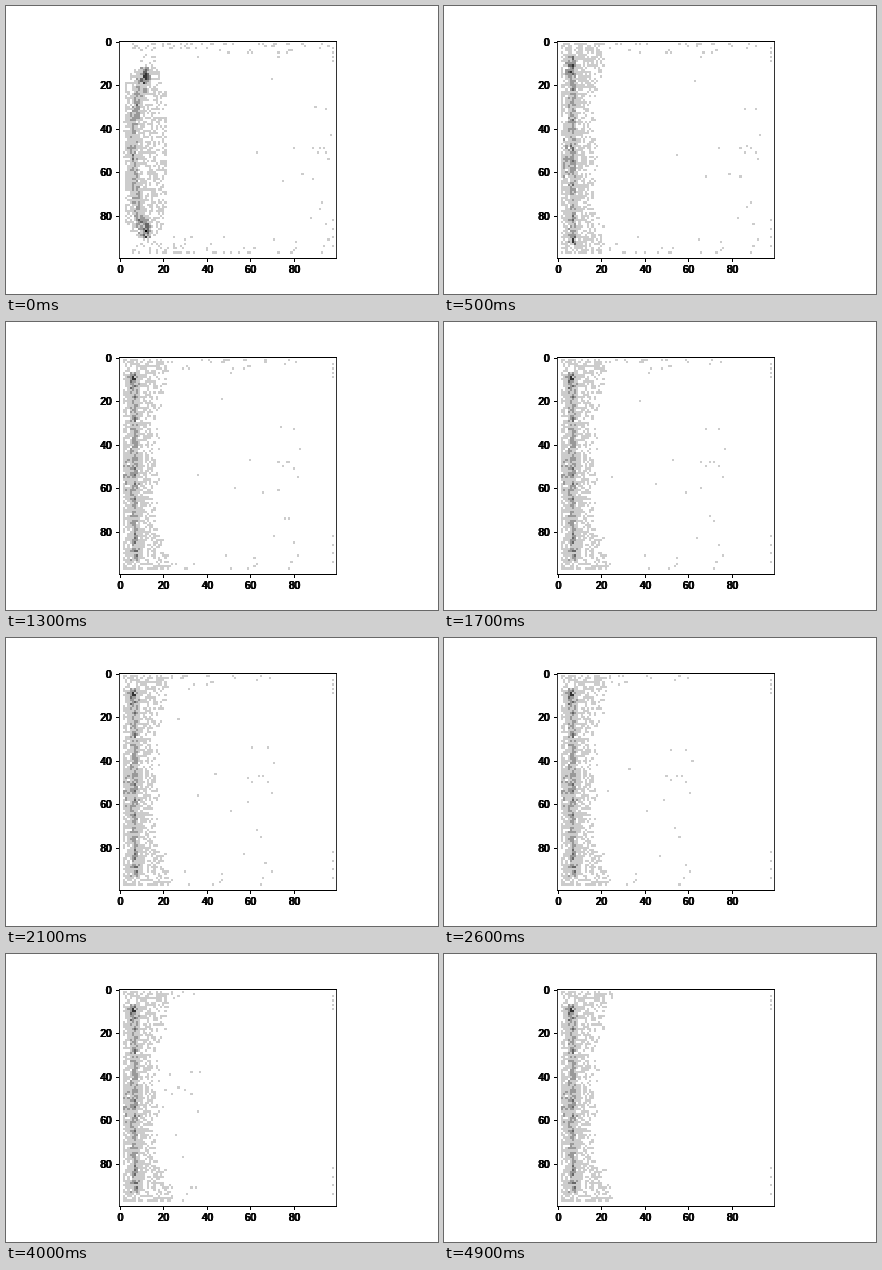
An HTML page with a canvas for the animation above (5000 ms loop, 432 by 288 pixels).

```html
<!DOCTYPE html>
<html>
<head>
<meta charset="utf-8">
<style>
html, body { margin: 0; width: 432px; height: 288px; overflow: hidden; background: #fff; }
canvas { display: block; }
</style>
</head>
<body>
<canvas id="stage" width="432" height="288"></canvas>
<script>
const ctx = document.getElementById("stage").getContext("2d");
const LEFT = 112.68, TOP = 34.56, CELL = 2.1744, STEPS = 50;

const clamp = v => Math.max(0, Math.min(1, v));
const bell = v => Math.exp(-v * v);
const spot = (c, r, x, y, w, h) => bell((c - x) / w) * bell((r - y) / h);

// Seeded random number in 0..1 for a pair of integers
function hash(a, b, seed = 0) {
  let h = a * 73856093 ^ b * 19349663 ^ (seed + 1) * 83492791;
  for (let i = 0; i < 3; i++) {
    h = Math.imul(h ^ (h >>> 16), 0x45d9f3b);
    h ^= h >>> 13;
  }
  return (h >>> 0) / 4294967296;
}

// Mean count per cell of the curved band at the beginning
function curved(c, r) {
  const y = Math.abs(r - 51) / 40;
  const ends = 2.5 * (spot(c, r, 12, 17, 1.5, 4) + spot(c, r, 12.5, 87, 1.5, 4));
  if (y < 1) {
    const light = c >= 2 + 8 * y ** 10 && c < 22 - 6 * y ** 6 ? 0.45 : 0;
    return light + 1.2 * bell((c - 6 - 6 * y * y) / 2.5) + ends;
  }
  if (r < 4 || r > 92) return c > 5 ? 0.25 * clamp((40 - c) / 20) : 0;
  return c > 8 && c < 17 ? 0.2 : 0;
}

// Mean count per cell of the settled straight band
function straight(c, r, step) {
  const end = Math.max(0, Math.abs(r - 50) / 50 - 0.45);
  const reach = 18.5 + end * (11 + step / 8);
  let mean = 0.6 * clamp((reach - c) / 6);
  if (r >= 7 && r <= 93)
    mean += 1.15 * bell((c - 6.8) / 1.9) + 1.5 * spot(c, r, 6, 12, 1.7, 4)
      + 0.7 * spot(c, r, 3, 55, 1.5, 10) + spot(c, r, 7.5, 91, 1.5, 3);
  return mean;
}

function cell(c, r, count = 1) {
  const x = Math.round(LEFT + c * CELL), y = Math.round(TOP + r * CELL);
  const g = Math.max(0, 255 - count * 51);
  ctx.fillStyle = `rgb(${g},${g},${g})`;
  ctx.fillRect(x, y, Math.round(LEFT + (c + 1) * CELL) - x, Math.round(TOP + (r + 1) * CELL) - y);
}

function drawBand(step) {
  const mix = clamp(step / 5), seed = Math.min(step, 10);
  for (let c = 2; c < 40; c++)
    for (let r = 1; r < 98; r++) {
      const mean = curved(c, r) * (1 - mix) + straight(c, r, step) * mix;
      const spread = 1 + Math.max(0, mean - 0.6);
      const n = Math.floor(mean + 0.5 + (hash(c, r, seed) - 0.5) * spread);
      if (n > 0) cell(c, r, n);
    }
}

// Particles pulled left with growing speed, faster when they start nearer
function drift(col, row, step, slope) {
  const shift = 0.55 * step ** 1.28 * (95 / col) ** 1.5;
  if (col - shift > 18) cell(Math.round(col - shift), Math.round(row + slope * shift));
}

function drawStrays(step) {
  for (let i = 0; i < 14; i++)
    drift(98 - 45 * hash(i, 1) ** 1.5, 15 + 72 * hash(i, 2), step, 0.4 * hash(i, 3) - 0.25);
  for (let i = 0; i < 5; i++)
    drift(89 + 1.5 * i, 48 + 4 * hash(i, 4), step, -0.05);
  for (let i = 0; i < 70; i++) {
    const depth = Math.floor(8 * hash(i, 5) ** 2.5);
    drift(25 + 73 * hash(i, 6), i % 2 ? 1 + depth : 97 - depth, step, 0);
  }
  for (let i = 0; i < 4; i++) {
    cell(98, 3 + 2 * i);
    cell(98, 82 + 4 * i);
  }
}

function drawAxes() {
  ctx.fillStyle = "#333";
  ctx.fillRect(113, 35, 1, 218);
  ctx.fillRect(330, 35, 1, 218);
  ctx.fillStyle = "#000";
  ctx.fillRect(113, 35, 218, 1);
  ctx.fillRect(113, 252, 218, 1);
  ctx.font = "10px 'Liberation Sans', Arial, sans-serif";
  for (let v = 0; v < 100; v += 20) {
    const x = Math.round(LEFT + (v + 0.5) * CELL), y = Math.round(TOP + (v + 0.5) * CELL);
    ctx.fillRect(x, 253, 1, 3);
    ctx.fillRect(110, y, 3, 1);
    // Labels are struck several times, slightly apart
    for (let i = 0; i < 4; i++) {
      ctx.textAlign = "center";
      ctx.fillText(v, x + i % 2, 267);
      ctx.textAlign = "right";
      ctx.fillText(v, 105 + i % 2, y + 4);
    }
  }
}

function draw(now) {
  const step = Math.floor(now / 100) % STEPS;
  ctx.fillStyle = "#fff";
  ctx.fillRect(0, 0, 432, 288);
  drawStrays(step);
  drawBand(step);
  drawAxes();
  requestAnimationFrame(draw);
}
draw(0);
</script>
</body>
</html>
```
